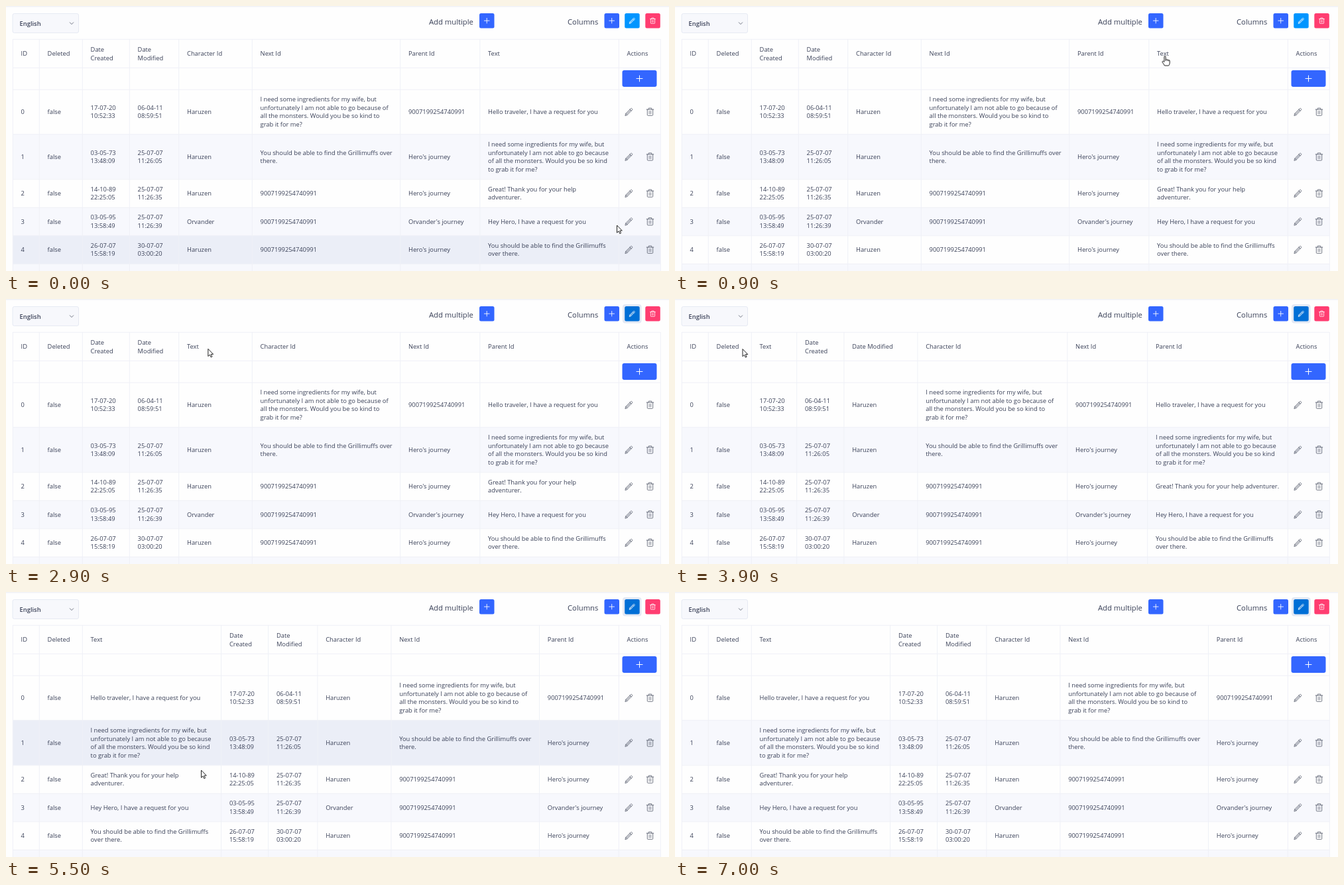
Recreate the animation shown at these times as an HTML page. Size 1000 px wide and 400 px high, loop 7200 ms.

```html
<!DOCTYPE html>
<html lang="en">
<head>
<meta charset="utf-8">
<style>
html, body { margin: 0; width: 100%; height: 100%; overflow: hidden; background: #fefefe; }
svg { display: block; font: 9.34px "Open Sans", sans-serif; fill: #3a4158; }
.line { stroke: #eff1f7; fill: none; }
.icon { fill: none; stroke: #666b7a; stroke-width: .9; stroke-linejoin: round; stroke-linecap: round; }
.light { stroke: #fff; stroke-width: 1; }
</style>
</head>
<body>
<svg id="stage" width="1000" height="400" viewBox="0 0 1000 400">
  <defs>
    <g id="plus"><path d="M-4.5 0H4.5M0-4.5V4.5"/></g>
    <g id="pencil"><path d="M-5.5 5.5L-4.8 2.6L2.9-5Q3.7-5.7 4.4-5L5-4.4Q5.7-3.7 5-2.9L-2.6 4.8ZM1.6-3.7L3.7-1.6M-4.8 2.6L-2.6 4.8M-3.4 3.4L2.4-2.4"/></g>
    <g id="trash"><path d="M-5.3-3.6H5.3M-2.2-3.6V-5.6H2.2V-3.6M-4.2-3.6V4.6Q-4.2 5.6-3.2 5.6H3.2Q4.2 5.6 4.2 4.6V-3.6"/><path d="M-1.6-1.2V3.2M0-1.2V3.2M1.6-1.2V3.2" stroke-width=".6"/></g>
  </defs>
  <rect width="1000" height="1.5" fill="#f1f2f6"/>
  <rect x="10" y="11.5" width="99.5" height="29" rx="2.5" fill="#f7f8fc" stroke="#e6eaf3"/>
  <text x="20.6" y="29.5" font-weight="600">English</text>
  <path class="icon" d="M96.3 24.8L99 27.6L101.7 24.8"/>
  <text x="638" y="27.5" font-size="11.25">Add multiple</text>
  <text x="847" y="27.5" font-size="11.25">Columns</text>
  <g id="bar"></g>
  <g id="rows"></g>
  <g id="table"></g>
  <g id="acts"></g>
  <path id="arrow" d="M0 0V11.2L2.6 8.8L4.3 12.6L6.1 11.8L4.4 8.1H7.8Z" fill="#fff" stroke="#222" stroke-width="1"/>
  <path id="hand" d="M-1.1.8Q0-.6 1.1.8V5.2Q2.6 4.3 3.4 5.6Q4.8 4.9 5.5 6.2Q7.2 5.8 7.2 7.6V10.6Q7 13 5.6 14.5H-.6Q-1.6 12.4-4 9.2Q-4.2 7.4-2.6 7.7L-1.1 9ZM1.1 5.2V7.5M3.4 5.6V7.6M5.5 6.2V7.8" fill="#fff" stroke="#222" stroke-width="1"/>
</svg>
<script>
const $ = id => document.getElementById(id);
const LOOP = 7200, STEP = 100, LINE = 12.5, RIGHT = 924;
const LEAVE = 5800;
const ROW_Y = [126, 193.5, 261.5, 304, 346.5, 389, 431.5];

const INGREDIENTS = "I need some ingredients for my wife, but|unfortunately I am not able to go because";
const MONSTERS = "all the monsters. Would you be so kind";
const FIND = "You should be able to find the Grillimuffs";
const BIG = "9007199254740991", HERO = "Hero's journey";
const HEAD = { C: "Date|Created", M: "Date|Modified", H: "Character Id", N: "Next Id", P: "Parent Id", T: "Text" };
const DATA = {
  C: ["17-07-20|10:52:33", "03-05-73|13:48:09", "14-10-89|22:25:05", "03-05-95|13:58:49", "26-07-07|15:58:19"],
  M: ["06-04-11|08:59:51", "25-07-07|11:26:05", "25-07-07|11:26:35", "25-07-07|11:26:39", "30-07-07|03:00:20"],
  H: ["Haruzen", "Haruzen", "Haruzen", "Orvander", "Haruzen"],
  N: [INGREDIENTS + " of|" + MONSTERS + " to|grab it for me?", FIND + " over|there.", BIG, BIG, BIG],
  P: [BIG, HERO, HERO, "Orvander's journey", HERO],
  T: ["Hello traveler, I have a request for you", INGREDIENTS + "|of " + MONSTERS + "|to grab it for me?",
    "Great! Thank you for your help|adventurer.", "Hey Hero, I have a request for you", FIND + "|over there."]
};

// Start time, header order, body order, left edges of the six movable columns
const WIDE = [115, 186, 260.4, 371, 594.4, 714.5];
const STATES = [
  [0, "CMHNPT", "CMHNPT", WIDE],
  [1800, "CMHNTP", "CMHNPT", WIDE],
  [2200, "CMHTNP", "CMHNPT", WIDE],
  [2900, "CMTHNP", "CMHNPT", WIDE],
  [3200, "CTMHNP", "CMHNPT", [115, 186, 257.4, 368.4, 592.4, 713.3]],
  [3500, "TCMHNP", "CMHNPT", [115, 183.4, 254.6, 365.6, 591.5, 712.4]],
  [4800, "TCMHNP", "TCMHNP", [115, 324.3, 395.3, 469.6, 580.6, 804.2]]
];

// Pointer track: time, x, y
const TRACK = [
  [-100, 923, 366], [0, 921.5, 331], [300, 880, 215], [700, 748, 85], [900, 739, 75.5], [1200, 944, 23], [1300, 944, 23],
  [1600, 740, 76], [2000, 533, 75], [3700, 102, 75.5], [3900, 102, 75.5], [4600, 122, 78], [4800, 122, 78],
  [5200, 143, 125.5], [5500, 294.5, 269], [5700, 396, 362], [LEAVE, 410, 380]
];

function pointer(t) {
  const i = TRACK.findIndex(k => k[0] >= t);
  if (i < 0) return TRACK[TRACK.length - 1].slice(1);
  if (i === 0) return TRACK[0].slice(1);
  const [t0, x0, y0] = TRACK[i - 1], [t1, x1, y1] = TRACK[i];
  const k = (t - t0) / (t1 - t0);
  return [x0 + (x1 - x0) * k, y0 + (y1 - y0) * k];
}

const rowAt = y => ROW_Y.findIndex((top, i) => y >= top && y < ROW_Y[i + 1]);
const rowMid = r => (ROW_Y[r] + ROW_Y[r + 1]) / 2;
const icon = (name, x, y, cls = "", scale = 1) =>
  `<use href="#${name}" class="icon ${cls}" transform="translate(${x} ${y}) scale(${scale})"/>`;

function cell(text, x, mid) {
  const lines = text.split("|");
  const top = mid + 3.3 - (lines.length - 1) * LINE / 2;
  return lines.map((s, i) => `<text x="${x + 12.6}" y="${top + i * LINE}">${s}</text>`).join("");
}

function tableMarkup([, heads, body, edges]) {
  const all = [10, 50, ...edges, RIGHT, 987];
  let out = all.map(x => `<path class="line" d="M${x + .3} 50V400"/>`).join("");
  out += [50, 93, ...ROW_Y].map(y => `<path class="line" d="M10 ${y + .3}H987"/>`).join("");
  out += cell("ID", 10, 72) + cell("Deleted", 50, 72) + cell("Actions", RIGHT, 72);
  edges.forEach((x, c) => {
    const width = (edges[c + 1] || RIGHT) - x;
    out += cell(width > 90 ? HEAD[heads[c]].replace("|", " ") : HEAD[heads[c]], x, 72);
    DATA[body[c]].forEach((s, r) => {
      if (s.startsWith("Great") && width > 210) s = s.replace("|", " ");
      out += cell(s, x, rowMid(r));
    });
  });
  for (let r = 0; r < 5; r++) out += cell(String(r), 10, rowMid(r)) + cell("false", 50, rowMid(r));
  return out;
}

function button(x, color, name, scale, id = "") {
  return `<rect ${id} x="${x}" y="11" width="22.5" height="22.5" rx="2.5" fill="${color}"/>` +
    icon(name, x + 11.2, 22.2, "light", scale);
}

$("bar").innerHTML =
  '<rect id="ring" x="930" y="8" width="28.5" height="28.5" rx="4" fill="#e3e9f4"/>' +
  button(714, "#3366ff", "plus", .85) + button(902.5, "#3366ff", "plus", .85) +
  button(933.2, "#0095ff", "pencil", .75, 'id="edit"') + button(964.3, "#ff3d71", "trash", .75);

$("rows").innerHTML = [0, 1, 2, 3, 4, 5].map(r =>
  `<rect x="10" y="${ROW_Y[r]}" width="977" height="${ROW_Y[r + 1] - ROW_Y[r]}"/>`).join("");

$("acts").innerHTML = '<rect x="929.5" y="97" width="52" height="25" rx="3" fill="#3366ff"/>' +
  icon("plus", 955.5, 109.5, "light") +
  [0, 1, 2, 3, 4].map(r => icon("pencil", 939.5, rowMid(r)) + icon("trash", 971.5, rowMid(r))).join("");

let shown = null;
function draw(t) {
  const state = STATES.filter(s => s[0] <= t).pop();
  if (state !== shown) $("table").innerHTML = tableMarkup(shown = state);

  // Row highlight trails the pointer by one step
  const hover = t - STEP > LEAVE ? -1 : rowAt(pointer(t - STEP)[1]);
  [...$("rows").children].forEach((el, r) =>
    el.setAttribute("fill", r === hover ? "#ebeef7" : r % 2 ? "#f7f8fd" : "#fefefe"));

  const editing = t >= 1300;
  $("edit").setAttribute("fill", editing ? "#006fd6" : "#0095ff");
  $("ring").style.display = editing ? "" : "none";

  const [x, y] = pointer(t);
  const onHead = x > 714 && x < RIGHT && y > 50 && y < 93;
  const onEdit = x > 933 && x < 956 && y < 34;
  const isHand = t < 1700 && (onHead || onEdit);
  for (const id of ["arrow", "hand"]) {
    $(id).setAttribute("transform", `translate(${x} ${y})`);
    $(id).style.display = t < LEAVE && isHand === (id === "hand") ? "" : "none";
  }
}

function tick() {
  draw(Math.floor(performance.now() % LOOP / STEP) * STEP);
  requestAnimationFrame(tick);
}
tick();
</script>
</body>
</html>
```
